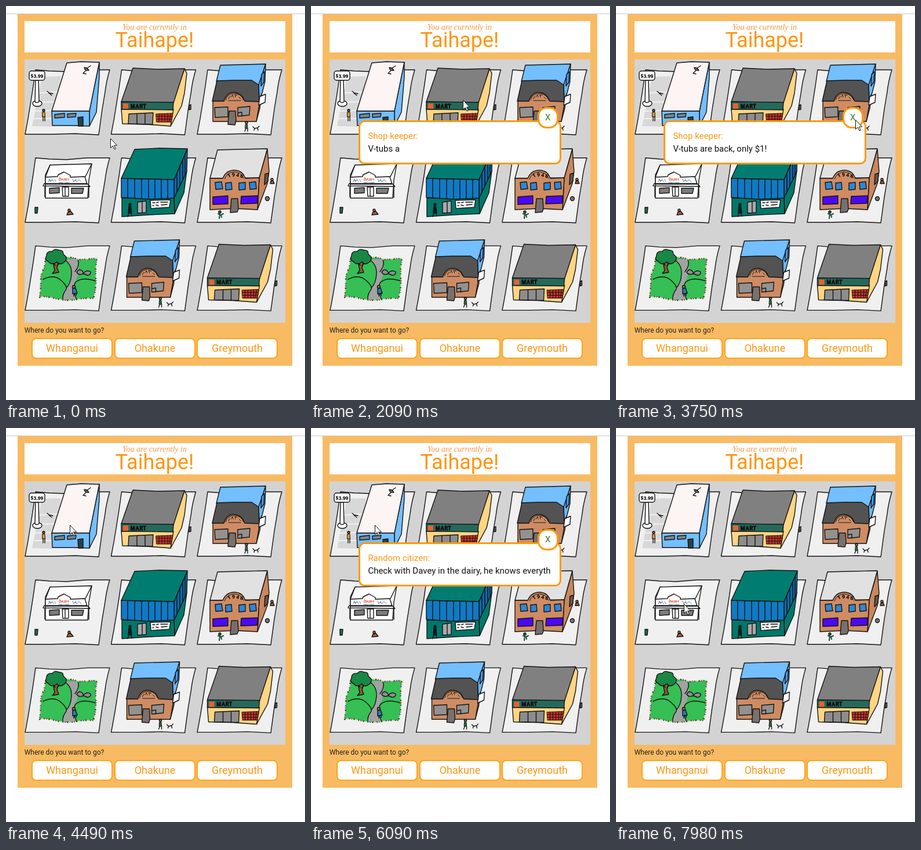
These frames come from a looping animation (516x679 px, 8 s). An HTML page:

```html
<!DOCTYPE html>
<html lang="en">
<head>
<meta charset="utf-8">
<title>Town map</title>
<style>
html, body { margin: 0; width: 100%; height: 100%; overflow: hidden; background: #fff; }
svg { display: block; width: 516px; height: 679px; font-family: Roboto, sans-serif; }
#map { stroke: #141414; stroke-width: 1.4; stroke-linejoin: round; stroke-linecap: round; }
#map text { stroke: none; font-family: "Noto Sans", sans-serif; font-weight: 700; }
.line { fill: none; }
.thin { stroke-width: 1; }
.flat { stroke: none; }
.mid { text-anchor: middle; }
.orange { fill: #ff9612; }
.button { fill: #fff; stroke: #ffa31a; stroke-width: 2; }
.box { fill: #fff; stroke: #ff9a0d; stroke-width: 3; }
#popup text { font-size: 15px; white-space: pre; }
</style>
</head>
<body>
<svg viewBox="0 0 516 679">
  <defs>
    <path id="paper" fill="#f0f0f0" d="M51 110L75 112L104 113L140 110L179 110Q173 130 171 148L166 178L160 222L120 220L78 221L33 221Q38 196 42 170L47 138Z"/>

    <g id="mart">
      <path fill="#ffd583" d="M308 108L312 116L308 150L303 172L284 207L288 167Z"/>
      <path fill="#ffd583" d="M199 178L289 178L284 207L243 204L201 203Z"/>
      <path fill="#808080" d="M219 107L262 109L308 108L289 167L245 166L199 165Z"/>
      <path fill="#246a5c" d="M199 165L289 166L288 179L199 178Z"/>
      <rect class="flat" x="202" y="168" width="9" height="9" fill="#e9622c"/>
      <text x="215" y="175.5" font-size="8.5" letter-spacing="1.2" fill="#101c1a">MART</text>
      <path fill="#8d8d8d" d="M212 186L254 184L253 204L211 203ZM226 186V203M240 185V204"/>
      <path class="thin" fill="#c5302a" d="M259 186L288 185L285 200L260 200Z"/>
      <path class="line thin" d="M259 190H287M260 195H286M264 186V200M269 186V200M274 186V200M279 185V200M284 185L282 200"/>
      <path fill="#666" d="M316 171L319 170V178L316 179Z"/>
    </g>

    <g id="brick">
      <path fill="#6bb8f8" d="M448 100L447 130L442 150L437 162L436 134Z"/>
      <path fill="#74bfff" d="M370 102L410 101L448 100L436 136L400 136L363 130Z"/>
      <path fill="#c9875e" d="M437 163L441 152L438 176L432 199Z"/>
      <path fill="#535353" d="M364 129L392 128L424 128L436 136L437 165L356 164Z"/>
      <path fill="#cf8c63" d="M357 164L376 164Q381 148 394 149T412 164L438 165L432 199L357 199Z"/>
      <path class="line thin" d="M379 162Q382 151 394 151T410 162M384 160L386 156M388 157L391 153L392 157M396 157L395 153L399 154M402 157L405 160M384 163H405"/>
      <path fill="#939291" d="M360 175L383 174L383 191L361 192Z"/>
      <path fill="#939291" d="M400 175L421 173L420 188L400 190ZM401 184L407 183V190"/>
      <path fill="#79716e" d="M385 181H396L397 198L395 205L383 204Z"/>
      <path fill="#4698ee" d="M441 118L446 113L445 131L440 138Z"/>
      <path fill="#fff" d="M438 156L448 152L447 166L436 171Z"/>
      <circle cx="415" cy="201" r="2" fill="#b87952"/>
      <path class="thin" fill="#167343" d="M413.5 204H416.5L417 211H413Z"/>
      <path class="line" d="M414 211L412 216M417 211V216M426 208L429 211L434 210L437 207M429 211L428 214M434 210L435 214"/>
    </g>

    <path id="lawn" d="M68 436Q82 440 95 435T126 437L157 435Q154 450 155 468T151 504Q135 503 120 506T85 504T58 502Q60 487 60 473T66 452Z"/>
  </defs>

  <rect width="516" height="679" fill="#fff"/>
  <rect y="13" width="516" height="1" fill="#c8c8c8"/>
  <rect x="20" y="14" width="474" height="606" fill="#f8bb63"/>
  <rect x="32" y="26" width="450" height="54" fill="#fff"/>
  <text class="mid" x="256.5" y="41" font-size="14" font-style="italic" font-family="Liberation Serif, serif" fill="#ff9440">You are currently in</text>
  <text class="mid orange" x="256.5" y="71" font-size="36">Taihape!</text>
  <rect x="32" y="92" width="450" height="454" fill="#d3d3d3"/>

  <g id="map">
    <g id="papers"></g>

    <!-- car park -->
    <path class="flat" fill="#d8d8d8" d="M62 122L95 121L80 208L45 207Z"/>
    <path class="line" stroke="#f0f0f0" stroke-width="2" d="M56 150L92 148M54 166L88 165M50 181L82 180M47 194L80 194"/>
    <ellipse cx="54" cy="168" rx="8" ry="5" fill="#fff"/>
    <path fill="#fff" d="M51 128L50 165Q53 168 57 165L56 128Z"/>
    <rect x="40" y="112" width="27" height="16" rx="4" fill="#fff"/>
    <text class="mid" x="53.5" y="123.5" font-size="8.5">$3.99</text>
    <path fill="#74bfff" d="M161 97L161 122L156 183L144 207L144 181Z"/>
    <path fill="#74bfff" d="M79 181L144 181L144 207L115 206L80 206Z"/>
    <path fill="#fdf4f4" d="M105 98L130 96L161 97L144 181L110 181L79 181Z"/>
    <path fill="#7a8790" d="M84 187L101 185V192L84 193ZM106 186L121 185L120 191L106 192Z"/>
    <path fill="#2d4047" d="M124 192L133 191L133 207H125Z"/>
    <path fill="#777" d="M135 106Q136 112 143 111L140 107Z"/>
    <path class="line" d="M140 107L146 103M138 111L133 116L138 117"/>
    <path class="line" d="M71 147L75 150L81 151M74 150L79 154"/>
    <circle cx="65" cy="180" r="2" fill="#8c5b3a"/>
    <path class="thin" fill="#e8992d" d="M63 183H67L67.5 191H63Z"/>
    <path class="line" d="M64 191V198M67 191L67 198"/>

    <use href="#mart"/>
    <use href="#brick"/>

    <!-- corner dairy -->
    <path fill="#fff" d="M76 274L110 273L148 272L143 300L141 331H68L68 291Z"/>
    <path fill="#fff" d="M68 307L68 295L89 294L90 291L100 286L111 292V295L136 294L140 307Z"/>
    <path class="line" d="M76 274L68 295M148 272L137 294M64 310L66 306L140 306L145 311L64 310M67 311V329M143 311V330"/>
    <text class="mid" x="100" y="301" font-size="6" fill="#d8512c">DAIRY</text>
    <path class="line thin" stroke="#4a8fb8" d="M73 303L75 298L77 303L80 299L82 303M84 299L86 303M115 298L117 303L120 299L122 303L126 299L130 303M91 304L100 305L109 304"/>
    <path class="line thin" stroke="#d8512c" d="M75 301L79 300M118 301L121 300M92 295L95 298"/>
    <path fill="#7c7c7c" d="M75 314L92 313V322L75 323ZM113 314L134 314L132 323H113Z"/>
    <path fill="#fff" d="M97 312H108V328H98ZM102 312V328"/>
    <path fill="#1e7043" d="M50 347H55L54 357H50Z"/>
    <circle cx="109" cy="352" r="2" fill="#b87952"/>
    <path fill="#b45d3b" d="M107 355L112 354L116 359L105 360Z"/>

    <!-- offices -->
    <path fill="#00786a" d="M290 331L312 284L307 322L291 358Z"/>
    <path fill="#00786a" d="M200 331H290L291 358L245 360L200 363Z"/>
    <path fill="#0d6aa8" d="M290 299L313 247L312 285L290 331Z"/>
    <path fill="#107ac4" d="M199 297L290 299V331L245 333L199 330Z"/>
    <path fill="#007d70" d="M222 247L265 245L313 246L290 299L240 298L199 297Z"/>
    <path class="line" d="M210 298V331M222 298V332M234 298V332M246 298V332M257 299V332M268 299V332M279 299V331M295 288V321M300 276V310M305 265V299M309 256V291"/>
    <path fill="#aaa" d="M227 338L242 336V356L227 357ZM235 337V356"/>
    <path fill="#f4f4f4" d="M249 335L284 334L282 347L250 349Z"/>
    <path class="line" d="M253 339H257M260 339L263 338M253 344H255M259 343L263 344M267 338H279M268 343L278 342"/>
    <circle cx="214" cy="342" r="2" fill="#222"/>
    <path fill="#151c20" d="M212 345H215.5L217 357H211Z"/>
    <path class="line" d="M212 357L210 363M216 357L217 362"/>

    <!-- hotel -->
    <path fill="#c9875e" d="M451 247L454 285L451 306L434 351L437 296Z"/>
    <path fill="#e1e1e1" d="M365 248L405 247L451 246L437 296L352 297Z"/>
    <path fill="#cf8c63" d="M352 297L374 297Q380 283 394 283T413 297L437 296L434 351L395 349L352 351Z"/>
    <path class="line thin" d="M377 298Q382 286 394 286T410 297"/>
    <text x="384" y="296" dy="0 -2 0 1" rotate="-25 -8 8 22" font-size="8.5" letter-spacing="1.6">1946</text>
    <path fill="#2e86d6" d="M361 304L372 303L374 315L362 316ZM379 305L389 304L390 316L379 317ZM402 305L413 304V316L402 317ZM420 304L431 303L432 315L421 316Z"/>
    <path fill="#4c08f5" d="M357 329L383 327V341L357 342ZM406 328L435 327L433 340L405 341Z"/>
    <path fill="#75706e" d="M389 332H400L401 350L399 355L387 356Z"/>
    <path fill="#6e5548" d="M447 290L453 288L452 302L446 308Z"/>
    <circle cx="451" cy="332" r="3.5" fill="#777"/>
    <circle cx="459" cy="299" r="2" fill="#b87952"/>
    <path fill="#b45d3b" d="M457 302L461 301L463 306H456Z"/>
    <circle cx="369" cy="355" r="2" fill="#167343"/>
    <path class="line" stroke="#174f35" stroke-width="2" d="M366 358L371 360L372 364M369 359L368 366M371 360L375 358"/>

    <!-- park -->
    <use href="#lawn" class="flat" fill="#35bf55"/>
    <path fill="#a2a2a2" stroke="none" d="M101 437Q114 446 113 462T102 488Q97 497 98 506H122Q112 487 120 474Q128 460 124 436Z"/>
    <path class="line" d="M64 471Q82 462 94 472T104 488Q97 497 98 506M101 437Q114 446 113 462T104 486M122 506Q113 487 120 476Q132 466 155 474M124 437Q128 447 119 458"/>
    <path fill="#8e8e8e" d="M122 459Q126 451 132 457L134 461Q126 465 122 459ZM133 461Q139 454 146 458Q147 464 140 464Z"/>
    <g id="flowers" fill="none" stroke-width="2.6" stroke-linecap="butt"></g>
    <path fill="#8c5a36" d="M81 440L84 456L80 461L91 459L88 451L91 440Z"/>
    <path class="line" d="M85 447L78 439M88 448L95 440"/>
    <path fill="#188844" d="M73 440Q66 438 70 430Q70 422 80 423Q84 417 92 421Q99 420 99 428Q108 434 101 441Q93 448 88 441Q79 448 73 440Z"/>
    <circle cx="117" cy="484" r="2.5" fill="#b87952"/>
    <path fill="#257fbb" d="M115 487L120 486L123 495L115 496Z"/>
    <path class="line" d="M117 496V500M121 495V499"/>

    <use href="#brick" x="-148.5" y="303"/>
    <use href="#mart" x="148.5" y="303.5"/>
  </g>

  <text x="31.7" y="563" font-size="12" fill="#222">Where do you want to go?</text>
  <g id="towns" class="mid" font-size="18"></g>

  <g id="popup">
    <rect id="panel" class="box" x="83.5" y="198.5" width="347" height="73" rx="9"/>
    <rect class="box" x="392.5" y="175.5" width="33" height="34" rx="14"/>
    <text class="mid" x="408.7" y="196.5" fill="#3b7a2b">X</text>
    <text id="who" class="orange" x="98.4" y="229"></text>
    <text id="line1" x="98.4" y="251" fill="#111"></text>
    <text id="line2" x="98.4" y="269" fill="#111"></text>
  </g>

  <path id="cursor" fill="#fff" stroke="#111" d="M.5 .5V16.5L4.2 13L7 19L9.3 18L6.6 12.2H11.5Z"/>
</svg>

<script>
const LOOP = 8000, CHAR_MS = 30;
const $ = id => document.getElementById(id);

let papers = '';
for (let i = 0; i < 9; i++)
  papers += `<use href="#paper" x="${i % 3 * 148.5}" y="${Math.floor(i / 3) * 151.7}"/>`;
$('papers').innerHTML = papers;

$('flowers').innerHTML = ['#d8342c', '#173c2b', '#e8cf3c', '#2d52a9'].map((color, i) =>
  `<use href="#lawn" stroke="${color}" stroke-dasharray="1.8 14.2" stroke-dashoffset="${i * 4}"/>`).join('');

$('towns').innerHTML = ['Whanganui', 'Ohakune', 'Greymouth'].map((name, i) => {
  const x = 45 + Math.round(i * 142.5);
  return `<rect class="button" x="${x}" y="573" width="138" height="34" rx="7"/>
    <text class="orange" x="${x + 69}" y="596">${name}</text>`;
}).join('');

// start, end, target x, target y
const moves = [
  [890, 1430, 261.5, 162],
  [3050, 3750, 413, 196],
  [3940, 4490, 110, 167],
  [7340, 7980, 116.5, 303]
];

// wrap: length at which the last word drops to a second line
const talks = [
  { from: 1840, to: 3950, who: 'Shop keeper:', lines: ['V-tubs are back, only $1!', ''], wrap: 99 },
  { from: 4670, to: 7110, who: 'Random citizen:',
    lines: ['Check with Davey in the dairy, he knows ', 'everything in this town.'], wrap: 47 }
];

function cursorAt(t) {
  let x = 180, y = 228;
  for (const [start, end, tx, ty] of moves) {
    const p = Math.min(1, Math.max(0, (t - start) / (end - start)));
    const e = p * p * (3 - 2 * p);
    x += (tx - x) * e;
    y += (ty - y) * e;
  }
  return [x, y];
}

function drawPopup(t) {
  const talk = talks.find(k => t >= k.from && t < k.to);
  $('popup').style.display = talk ? '' : 'none';
  if (!talk) return;
  const count = Math.floor((t - talk.from) / CHAR_MS);
  const wrapped = count > talk.wrap;
  const typed = talk.lines.join('').slice(0, count);
  const split = wrapped ? talk.lines[0].length : typed.length;
  $('who').textContent = talk.who;
  $('line1').textContent = typed.slice(0, split);
  $('line2').textContent = typed.slice(split);
  $('panel').setAttribute('height', wrapped ? 91 : 73);
}

const begin = performance.now();
function frame() {
  const t = (performance.now() - begin) % LOOP;
  const [x, y] = cursorAt(t);
  $('cursor').setAttribute('transform', `translate(${Math.round(x)} ${Math.round(y)})`);
  drawPopup(t);
  requestAnimationFrame(frame);
}
frame();
</script>
</body>
</html>
```
